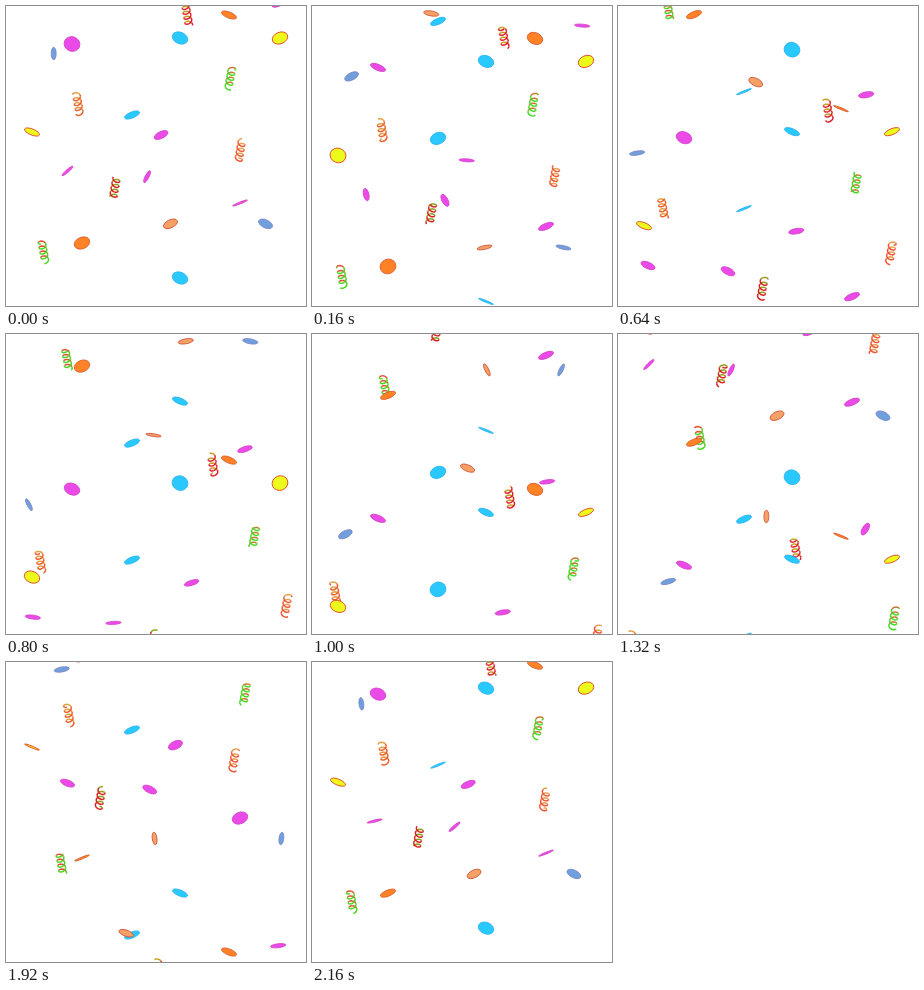
Animation, 300 px wide and 300 px high, one loop 2.2 s. Source, as an HTML page with a canvas:

```html
<!DOCTYPE html>
<html lang="en">
<head>
<meta charset="utf-8">
<title>Confetti</title>
<style>
html, body { margin: 0; width: 100%; height: 100%; overflow: hidden; background: #fff; }
canvas { display: block; width: 100vw; height: 100vh; }
</style>
</head>
<body>
<canvas id="stage" width="300" height="300"></canvas>
<script>
const LOOP = 2200, STEP = 40, RAD = Math.PI / 180;
const ctx = document.getElementById('stage').getContext('2d');

// fill, edge
const COLORS = {
  cyan: ['#29c8ff', '#2db4f0'],
  magenta: ['#ea4be8', '#d642c4'],
  orange: ['#ff8326', '#dc5a30'],
  yellow: ['#ecfb1c', '#e03a28'],
  peach: ['#f5a064', '#cf5038'],
  blue: ['#6f9fdc', '#7d86c4']
};

// Straight fallers: colour, x, y at time 0, tilt direction
const FALLERS = [
  ['cyan', 174, 32, 1], ['cyan', 174, 272, 1],
  ['cyan', 126, 109, -1], ['cyan', 126, 314, -1],
  ['magenta', 66, 38, 1], ['magenta', 234, 197, -1],
  ['orange', 76, 237, -1], ['orange', 223, 9, 1],
  ['yellow', 274, 32, -1], ['yellow', 26, 126, 1]
];

// Swaying discs: colour, turning point x, time offset, side
const SWAYERS = [
  ['magenta', 154, 959, -1], ['magenta', 64, 1191, 1],
  ['magenta', 145, 1230, 1], ['magenta', 235, 75, -1],
  ['peach', 143, 1549, -1], ['peach', 156, 2190, 1],
  ['blue', 19, 430, -1], ['blue', 281, 1549, 1]
];

// Streamers: front, back, turning point x, time offset, side
const STREAMERS = [
  ['#e01c2c', '#c8a020', 210, 196, 1],
  ['#3edc1c', '#c87830', 221, 640, -1],
  ['#ee5a28', '#e0a040', 72, 796, 1],
  ['#f05030', '#e8a050', 228, 1078, -1],
  ['#d81c1c', '#90a018', 90, 1309, -1],
  ['#48d41c', '#e05030', 82, 1712, 1]
];

// Time -> height
const DISC_FALL = [[0, -14], [692, 85], [1056, 145], [2200, 314]];
const COIL_FALL = [[0, -17], [550, 57], [1150, 157], [2200, 322]];

// Distance in the tumble -> angle, thickness
const TUMBLE = [
  [0, -15, 2], [6, -47, 3], [18, -88, 5], [24, -90, 5], [35, -120, 6],
  [40, -153, 7], [58, -155, 8], [63, -170, 6], [75, -172, 2.5],
  [94, -160, 6], [106, -153, 7], [117, -170, 5], [123, -172, 4], [135, -195, 2]
];

const mod = (a, n) => ((a % n) + n) % n;

function lookup(table, at, col = 1) {
  let i = 1;
  while (i < table.length - 1 && at > table[i][0]) i++;
  const a = table[i - 1], b = table[i];
  return a[col] + (b[col] - a[col]) * (at - a[0]) / (b[0] - a[0]);
}

function disc(color, x, y, length, thick, angle) {
  const [fill, edge] = COLORS[color];
  ctx.save();
  ctx.translate(x, y);
  ctx.rotate(angle * RAD);
  ctx.beginPath();
  ctx.ellipse(0, 0, length / 2, thick / 2, 0, 0, 2 * Math.PI);
  ctx.fillStyle = fill;
  ctx.fill();
  ctx.strokeStyle = edge;
  ctx.lineWidth = 0.8;
  ctx.stroke();
  ctx.restore();
}

function faller([color, x, y0, side], t) {
  const y = mod(y0 + 322 * t / LOOP + 11, 322) - 11;
  const turn = 322 / 3;
  const off = Math.abs(mod(y - 40 + turn / 2, turn) - turn / 2);
  const thick = off < 7 ? 14.5 : off < 18 ? 11.5 : off < 40 ? 6 : 1.8;
  disc(color, x, y, 16, thick, 22 * side);
}

function swayer([color, x, offset, side], t) {
  const y = lookup(DISC_FALL, (t + offset) % LOOP);
  const a = (y - 143) * 2 * Math.PI / 322;
  const sway = -21.3 + 19 * Math.cos(a) + 2.3 * Math.cos(2 * a);
  const u = mod(y - 25, 135);
  const angle = lookup(TUMBLE, u);
  const length = 12.5 + 3 * Math.cos(angle * RAD) ** 2;
  disc(color, x + side * sway, y, length, lookup(TUMBLE, u, 2), angle * side);
}

function streamer([front, back, x, offset, side], t) {
  const y = lookup(COIL_FALL, (t + offset) % LOOP);
  const sway = 28.5 * (Math.cos((y - 100) * (y < 100 ? 1 : 0.857) * RAD) - 1);
  ctx.save();
  ctx.translate(x + side * sway, y);
  ctx.rotate(-10 * side * RAD);
  ctx.scale(side, 1);
  ctx.lineWidth = 1.5;
  const turns = 4, parts = 16, spin = y / 30;
  const point = k => {
    const a = k / parts * 2 * Math.PI + spin;
    return [3.8 * Math.cos(a), -10 + 20 * k / (parts * turns) + 2.6 * Math.sin(a)];
  };
  // Back strands first, then the front ones
  for (const isFront of [false, true]) {
    ctx.strokeStyle = isFront ? front : back;
    ctx.beginPath();
    for (let k = 0; k < parts * turns; k++) {
      const facing = Math.sin((k + 0.5) / parts * 2 * Math.PI + spin) > -0.35;
      if (facing !== isFront) continue;
      ctx.moveTo(...point(k));
      ctx.lineTo(...point(k + 1));
    }
    ctx.stroke();
  }
  ctx.restore();
}

const start = performance.now();

function draw() {
  const t = Math.floor((performance.now() - start) % LOOP / STEP) * STEP;
  ctx.fillStyle = '#fff';
  ctx.fillRect(0, 0, 300, 300);
  STREAMERS.forEach(s => streamer(s, t));
  FALLERS.forEach(f => faller(f, t));
  SWAYERS.forEach(s => swayer(s, t));
  requestAnimationFrame(draw);
}
draw();
</script>
</body>
</html>
```
